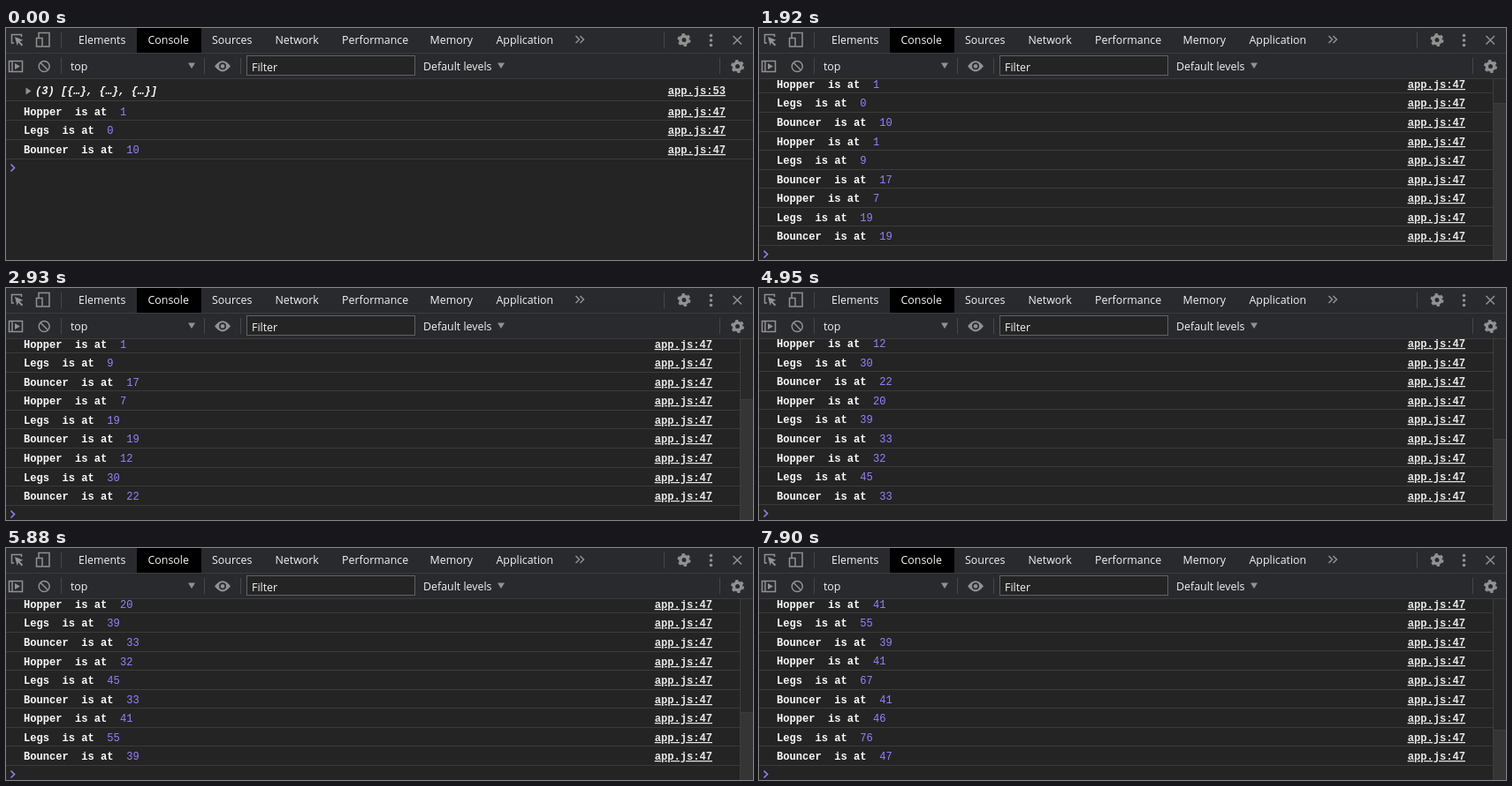
Write an HTML page that moves like this. It is 845 px wide and 263 px high and loops after 8 s.

```html
<!DOCTYPE html>
<html lang="en">
<head>
<meta charset="utf-8">
<title>Console race</title>
<style>
  html, body { margin: 0; width: 100%; height: 100%; overflow: hidden; background: #242424; }
  svg { display: block; width: 845px; height: 263px; }
  text { white-space: pre; }
  .ui { font: 12.4px "Open Sans", "Noto Sans", sans-serif; fill: #f4f4f4; }
  .log { font: bold 12.1px "Liberation Mono", monospace; fill: #fafafa; }
  .array { font-style: italic; }
  .number { font-weight: 400; fill: #9980ff; }
  .link { fill: #e8e8e8; text-anchor: end; text-decoration: underline; }
  .rule { stroke: #3b3b3b; }
  .icon { fill: none; stroke: #919191; stroke-width: 1.5; }
  .solid { fill: #919191; }
</style>
</head>
<body>
<svg viewBox="0 0 845 263">
  <defs>
    <g id="gear">
      <circle r="4.2" fill="none" stroke="#919191" stroke-width="3.4"/>
      <circle r="6.2" fill="none" stroke="#919191" stroke-width="2.6" stroke-dasharray="3.246"/>
    </g>
    <path id="down" class="solid" d="M-4-3h8L0 3.5z"/>
  </defs>
  <rect width="845" height="263" fill="#242424"/>
  <g id="console" class="log"></g>

  <rect width="845" height="57" fill="#292a2d"/>
  <path class="rule" d="M0 28.5H845M0 57.5H845"/>
  <path d="M148 0h73v28h-73z"/>
  <path stroke="#45474a" d="M62.5 5v18M744.5 5v18M62.5 34v18M224.5 34v18M265.5 34v18M807.5 34v18"/>
  <g id="tabs" class="ui"></g>

  <path class="icon" d="M9 17H6.5V7.5H17.5V10"/>
  <path class="solid" d="M10 10l9.5 3.7-4 1.5 3.7 3.8-1.5 1.4-3.7-3.8-1.4 3.4z"/>
  <path class="icon" d="M37 11V5.5h12V21h-7M34.5 11.5h6.5v9.5h-6.5z"/>
  <path class="icon" d="M644.5 9l4 4-4 4M649.5 9l4 4-4 4"/>
  <use href="#gear" x="767" y="13.5"/>
  <g class="solid">
    <circle cx="797.5" cy="8.5" r="1.8"/><circle cx="797.5" cy="14" r="1.8"/><circle cx="797.5" cy="19.5" r="1.8"/>
  </g>
  <path class="icon" d="M822.5 9l9.5 9.5M832 9l-9.5 9.5"/>

  <path class="icon" d="M3.5 37.5h15v12h-15zM7 37v13"/>
  <path class="solid" d="M10 40l6 3.5-6 3.5z"/>
  <path class="icon" d="M38.7 39l9 9"/>
  <circle class="icon" cx="43.2" cy="43.5" r="6"/>
  <use href="#down" x="210" y="42.5"/>
  <path class="solid" d="M236 43.3Q245 31 254 43.3Q245 55.5 236 43.3z"/>
  <circle cx="245" cy="43.3" r="3.2" fill="#919191" stroke="#292a2d" stroke-width="1.6"/>
  <rect x="272.5" y="31.5" width="190" height="22" fill="#242424" stroke="#606164"/>
  <g class="ui">
    <text x="73" y="48">top</text>
    <text x="278" y="49">Filter</text>
    <text x="472" y="48">Default levels</text>
  </g>
  <use href="#down" x="560" y="42.5"/>
  <use href="#gear" x="827.5" y="43.5"/>
</svg>

<script>
const LOOP = 8000, PITCH = 21.55;
const names = ["Hopper", "Legs", "Bouncer"];
const rounds = [
  [1, 0, 10], [1, 9, 17], [7, 19, 19], [12, 30, 22], [20, 39, 33],
  [32, 45, 33], [41, 55, 39], [41, 67, 41], [46, 76, 47]
];
const roundTimes = [0, 910, 1920, 2930, 3940, 4950, 5880, 6890, 7900];
// Centre of the first visible row; fractions decide how rows snap to pixels.
const firstRow = [95.4, 95.4, 64.4, 64.2, 63.95, 63.75, 64.4, 64.3, 64.3];
const thumbTop = [0, 0, 85, 126, 152, 171, 186, 197, 206];

const tabs = { Elements: 82, Console: 160.5, Sources: 233, Network: 304.5, Performance: 380, Memory: 479.5, Application: 554.5 };
document.getElementById("tabs").innerHTML = Object.entries(tabs)
  .map(([label, x]) => `<text x="${x}" y="18">${label}</text>`).join("");

const rule = (y, width) => `<path class="rule" d="M0 ${y + 0.5}H${width}"/>`;
const link = (y, right, line) => `<text class="link" x="${right}" y="${y}">app.js:${line}</text>`;

function consoleMarkup(round) {
  const scrolled = round > 1;
  const width = scrolled ? 830 : 845;
  const right = width - 31;
  const top = firstRow[round];
  const rows = rounds.slice(Math.max(0, round - 2), round + 1)
    .flatMap(values => values.map((value, i) => [names[i], value]));

  let markup = scrolled ? "" :
    `<path class="solid" d="M22.5 67.5l6 4-6 4z"/>
     <text class="array" x="33" y="75">(3) [{…}, {…}, {…}]</text>` + link(75, right, 53) + rule(82, width);

  rows.forEach(([name, value], i) => {
    const baseline = Math.floor(top + PITCH * i) + 4;
    markup += `<text x="20" y="${baseline}">${name}  is at  <tspan class="number">${value}</tspan></text>`
      + link(baseline, right, 47)
      + rule(Math.floor(top + PITCH * (i + 0.5) - 1.22), width);
  });

  const promptY = Math.floor(top + PITCH * rows.length) - 2;
  markup += `<path d="M5.5 ${promptY - 3.5}l4 4-4 4" fill="none" stroke="#8f7de8" stroke-width="1.7"/>`;

  if (scrolled) {
    const y = thumbTop[round];
    markup += `<path fill="#292929" d="M830 58h15v205h-15z"/>
      <path fill="#353535" d="M830 ${y}h15V263h-15z"/>
      <path stroke="#3d3d3d" d="M830.5 58V263M830 ${y + 0.5}h15"/>`;
  }
  return markup;
}

const consoleGroup = document.getElementById("console");
const start = performance.now();
let shown = -1;

function draw() {
  const time = (performance.now() - start) % LOOP;
  const round = roundTimes.findLastIndex(t => t <= time);
  if (round !== shown) consoleGroup.innerHTML = consoleMarkup(shown = round);
  requestAnimationFrame(draw);
}
draw();
</script>
</body>
</html>
```
